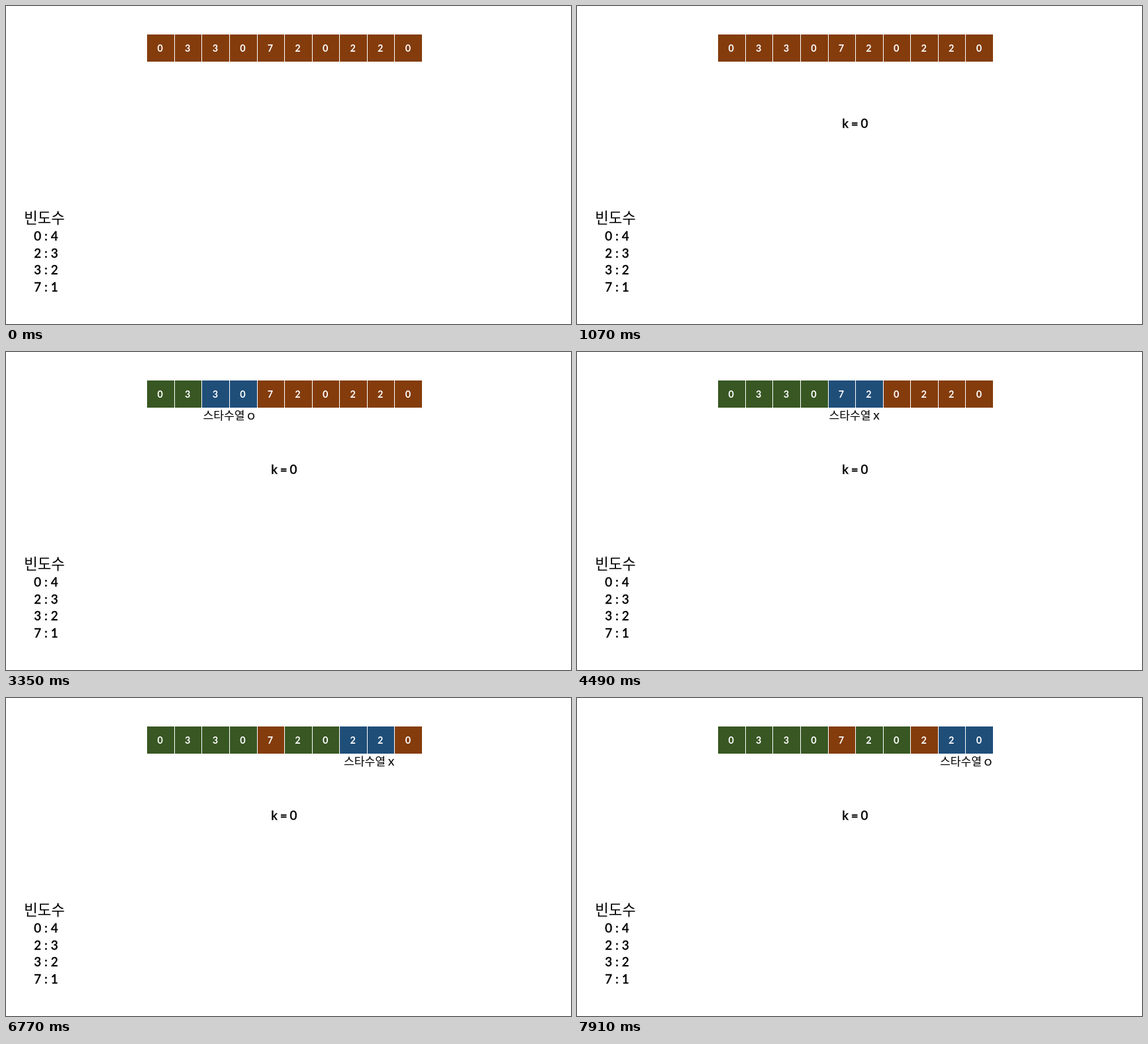
Write an HTML page that moves like this. It is 853 px wide and 480 px high and loops after 8 s.

```html
<!DOCTYPE html>
<html lang="ko">
<head>
<meta charset="utf-8">
<title>스타수열</title>
<style>
  html, body { margin: 0; width: 100%; height: 100%; overflow: hidden; background: #fff; }
  svg { display: block; width: 100%; height: 100%; }
  .latin { font: 500 18.7px Lato, sans-serif; word-spacing: 0.3px; text-anchor: middle; stroke: #000; stroke-width: 0.4px; }
  .key { word-spacing: -0.7px; }
  .digit { font: 700 14.4px Lato, sans-serif; text-anchor: middle; fill: #fff; }
  .hangul { font: 400 17.2px "Noto Sans CJK KR", "Noto Sans CJK", sans-serif; }
  .title { font-size: 22.3px; }
  .mark { font: 500 13.8px Lato, sans-serif; stroke: #000; stroke-width: 0.2px; }
</style>
</head>
<body>
<svg id="stage" viewBox="0 0 853 480"></svg>
<script>
const LOOP = 8000, FIRST = 1070, STEP = 1140;
const VALUES = [0, 3, 3, 0, 7, 2, 0, 2, 2, 0];
const COUNTS = [[0, 4], [2, 3], [3, 2], [7, 1]];
const LEFT = 212.75, PITCH = 41.57;
const BROWN = '#843c0c', BLUE = '#1f4e79', GREEN = '#385723';

// start: left cell of the checked pair; x, y: label position
const CHECKS = [
  { start: 0, x: 213.8, y: 110 },
  { start: 2, x: 297.4, y: 102 },
  { start: 4, x: 380.4, y: 102 },
  { start: 5, x: 422.4, y: 102 },
  { start: 7, x: 509.9, y: 102 },
  { start: 8, x: 547.9, y: 102 },
];

const stage = document.getElementById('stage');

function add(tag, attrs, text = '', parent = stage) {
  const node = document.createElementNS('http://www.w3.org/2000/svg', tag);
  for (const key in attrs) node.setAttribute(key, attrs[key]);
  node.textContent = text;
  return parent.appendChild(node);
}

// Each cell leaves a one pixel gap on its left
const edge = i => Math.floor(LEFT + PITCH * i);

const cells = VALUES.map((value, i) => {
  const x = edge(i) + 1;
  const rect = add('rect', { x, y: 43, width: edge(i + 1) - x, height: 41, fill: BROWN });
  add('text', { class: 'digit', x: 232.7 + PITCH * i, y: 69 }, value);
  return rect;
});

add('text', { class: 'hangul title', x: 27.2, y: 328 }, '빈도수');
COUNTS.forEach(([value, count], i) =>
  add('text', { class: 'latin', x: 60.4, y: 354.3 + 25.4 * i }, `${value} : ${count}`));

const key = add('text', { class: 'latin key', x: 419.8, y: 184 }, 'k = 0');
const label = add('g', {});
add('text', { class: 'hangul' }, '스타수열', label);
const mark = add('text', { class: 'mark', x: 67 }, '', label);

// A pair counts when its values differ and one of them is 0
function isStar({ start }) {
  const [a, b] = VALUES.slice(start, start + 2);
  return a !== b && (a === 0 || b === 0);
}

const covers = (check, i) => i === check.start || i === check.start + 1;

function draw(time) {
  const step = Math.floor((time - FIRST) / STEP);
  const current = CHECKS[step - 1];
  const done = CHECKS.slice(0, Math.max(0, step - 1)).filter(isStar);

  cells.forEach((cell, i) => {
    const color = current && covers(current, i) ? BLUE
      : done.some(check => covers(check, i)) ? GREEN : BROWN;
    cell.setAttribute('fill', color);
  });

  key.setAttribute('visibility', step >= 0 ? 'visible' : 'hidden');
  label.setAttribute('visibility', current ? 'visible' : 'hidden');
  if (current) {
    label.setAttribute('transform', `translate(${current.x} ${current.y})`);
    mark.textContent = isStar(current) ? 'O' : 'X';
  }
}

const origin = performance.now();
function tick() {
  draw((performance.now() - origin) % LOOP);
  requestAnimationFrame(tick);
}
tick();
</script>
</body>
</html>
```
